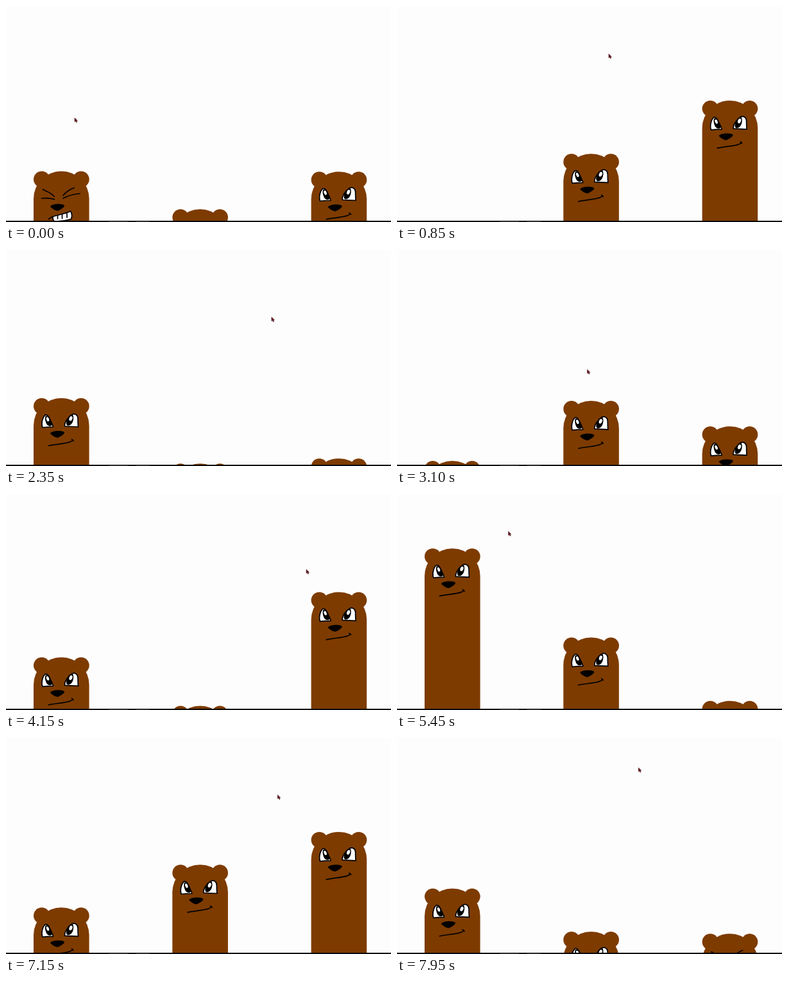
Write an HTML page that moves like this. It is 600 px wide and 338 px high and loops after 8 s.

```html
<!DOCTYPE html>
<html lang="en">
<head>
<meta charset="utf-8">
<title>Bears popping up</title>
<style>
  html, body { margin: 0; width: 100%; height: 100%; overflow: hidden; background: #fefdfe; }
  svg { display: block; width: 100vw; height: 100vh; }
  .ink { fill: none; stroke: #000; stroke-width: 1.7; stroke-linecap: round; stroke-linejoin: round; }
  .white { fill: #fff; }
</style>
</head>
<body>
<svg viewBox="0 0 600 338">
  <defs>
    <g id="body" fill="#7d3b00">
      <circle cx="12.7" cy="12.7" r="12.7"/>
      <circle cx="74" cy="12.7" r="12.7"/>
      <path d="M0 400V43a43.3 43 0 0 1 86.600 0V400Z"/>
    </g>
    <path id="nose" d="M26 55C29 51 44 50 48 53.500C49 56 41 61 37.500 62C34 62 27 57.500 26 55Z"/>
    <g id="calm">
      <path class="ink white" d="M14 46C11.500 40 14 30 18 26.500C22 25 24 30 26 34C28 39 30 42 30.500 45Q22 45 14 46Z"/>
      <path d="M18.500 28C24 27 27 34 29 42C26 46 21 43 19.500 39Q17 33 18.500 28Z"/>
      <ellipse class="white" cx="22" cy="33" rx="2" ry="3.500" transform="rotate(-20 22 33)"/>
      <path class="ink white" d="M48.500 44C48 38 54 29 60 25.500C65 23.500 69 27 69 32Q69 39 69.500 45Q58 44.500 48.500 44Z"/>
      <path d="M51 39C51 33 56 27 61 26C64 31 61 43 54 43Q51 43 51 39Z"/>
      <ellipse class="white" cx="58" cy="32" rx="2.400" ry="3.800" transform="rotate(20 58 32)"/>
      <use href="#nose"/>
      <path class="ink" d="M23.500 74.500C34 72 50 71.500 57 68.500Q60.500 67 61 65.500M59.500 64.500L62 67"/>
    </g>
    <g id="hurt">
      <path class="ink" d="M14.500 28.500C20 32 27 33 32 39.500M12.500 42.500Q24 41.500 32.500 44M46 38C51 32 55 29 63 26M46 42.500C54 38 62 36 72 35"/>
      <use href="#nose"/>
      <path class="ink white" d="M30 71C39 68 49 67 57.500 62.500C60 66 60 71 58.500 75Q45 79 32 78.500Q29.500 75 30 71Z"/>
      <path class="ink" d="M23.500 75Q27 72 30 71M37.500 69.500V74.500M44.500 68V74M52 66V72.500"/>
    </g>
  </defs>
  <rect width="600" height="338" fill="#fefdfe"/>
  <g id="bears"></g>
  <rect y="336" width="600" height="2" fill="#0c0a0c"/>
  <path d="M160 337.500H190M202 337.500H224" stroke="#4a484a"/>
  <path id="cursor" d="M0 0V6.200L1.500 4.900L2.600 7.300L3.700 6.800L2.700 4.500H4.500Z" fill="#701820" stroke="#2a0a10" stroke-width=".5"/>
</svg>
<script>
const LOOP = 8000, STEP = 50;
const SPEED = 0.131, HURT_SPEED = 0.334; // px per ms
const HIDDEN = 345, LEFT = 43, GAP = 216.3;

// A hop climbs to its peak, then sinks, faster when the bear is hit there.
const hop = (time, peak, hit = false) => ({ time, peak, hit });
const hops = [
  [hop(-250, 175, true), hop(2058, 193.5), hop(5558, 71, true), hop(7664, 198)],
  [hop(756, 219), hop(3260, 215), hop(6400, 100)],
  [hop(1544, 57, true), hop(4093, 146), hop(7382, 116.5, true)]
];

// Turning points of the pointer: ms, x, y.
const turns = [
  [0, 107, 175], [850, 330, 75], [1650, 504.5, 43], [1800, 500, 45], [3100, 296.5, 187],
  [4150, 468, 118], [5450, 173.5, 58.5], [6350, 234, -5], [6800, 300, 42],
  [7382, 505, 120], [LOOP, 365, 40]
];

function heightOf({ time, peak, hit }, t) {
  const age = t - time;
  return peak + (age < 0 ? -age * SPEED : age * (hit ? HURT_SPEED : SPEED));
}

function pointer(t) {
  const i = turns.findIndex(turn => turn[0] > t);
  const [t0, x0, y0] = turns[i - 1], [t1, x1, y1] = turns[i];
  const k = (t - t0) / (t1 - t0);
  return [x0 + (x1 - x0) * k, y0 + (y1 - y0) * k];
}

function add(parent, tag, href) {
  const node = document.createElementNS("http://www.w3.org/2000/svg", tag);
  if (href) node.setAttribute("href", href);
  return parent.appendChild(node);
}

const place = (node, x, y) => node.setAttribute("transform", `translate(${x} ${y})`);
const cursor = document.getElementById("cursor");

const bears = hops.map((list, i) => {
  const node = add(document.getElementById("bears"), "g");
  add(node, "use", "#body");
  return { list, node, x: LEFT + GAP * i, face: add(node, "use", "#calm") };
});

function draw(t) {
  for (const { list, node, x, face } of bears) {
    const current = list.reduce((a, b) => heightOf(a, t) < heightOf(b, t) ? a : b);
    place(node, x, Math.min(heightOf(current, t), HIDDEN));
    face.setAttribute("href", current.hit && t >= current.time ? "#hurt" : "#calm");
  }
  place(cursor, ...pointer(t));
}

const start = performance.now();
function tick() {
  const t = (performance.now() - start) % LOOP;
  draw(Math.floor(t / STEP) * STEP);
  requestAnimationFrame(tick);
}
tick();
</script>
</body>
</html>
```
